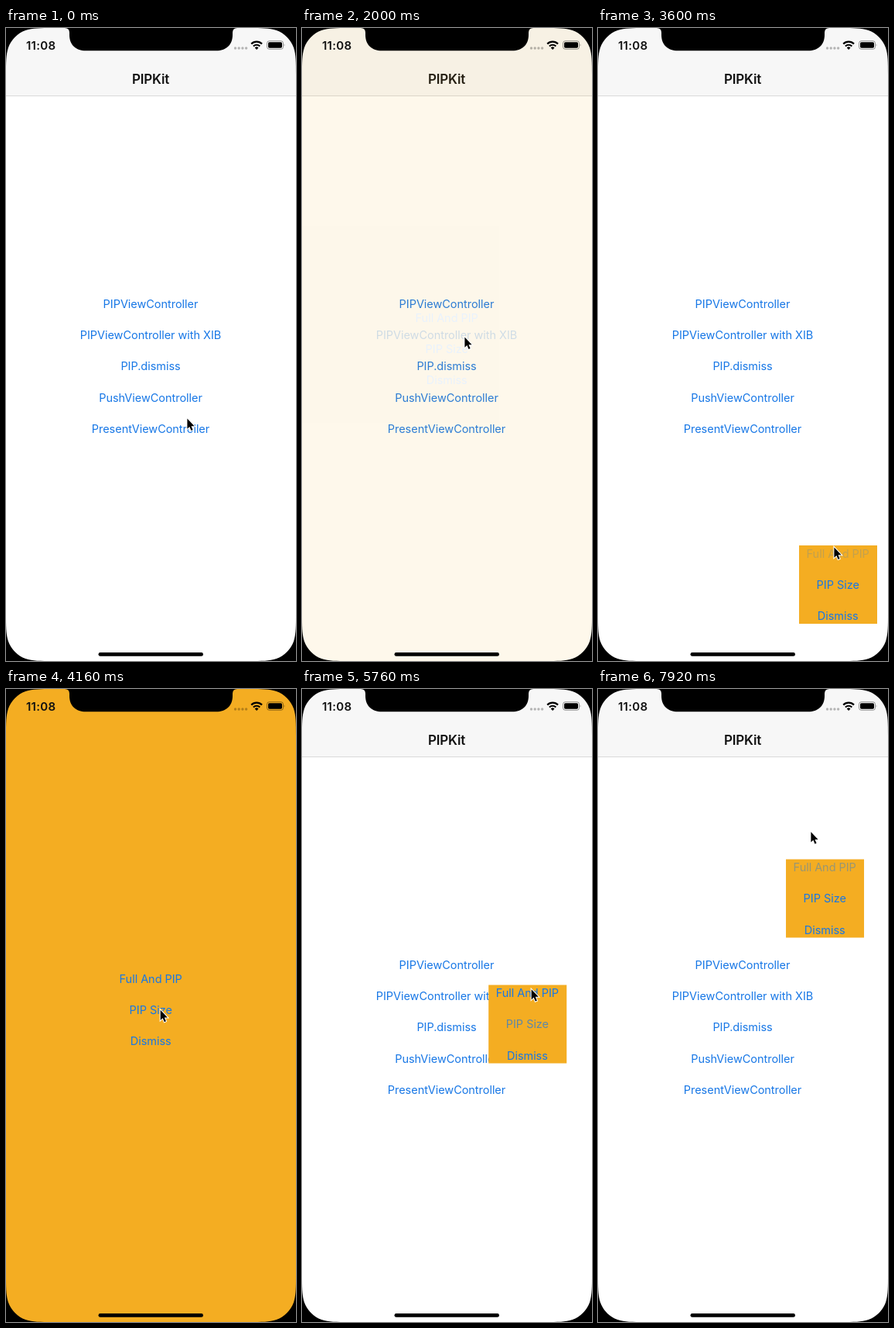
These frames come from a looping animation (375x816 px, 8 s). An HTML page:

```html
<!DOCTYPE html>
<html lang="en">
<head>
<meta charset="utf-8">
<title>PIPKit</title>
<style>
  html, body { margin: 0; width: 100%; height: 100%; overflow: hidden; background: #000; }
  svg { display: block; width: 100%; height: 100%; }
  text { font-family: Inter, Roboto, sans-serif; text-anchor: middle; }
  .btn { font-size: 14.5px; letter-spacing: -.04px; fill: #1777e6; }
  .bold { font-weight: 600; fill: #111; }
</style>
</head>
<body>
<svg viewBox="0 0 375 816">
  <defs>
    <path id="corner" d="M0 0V61C0 43.5 0 34.7 3 25.3C6.8 14.9 14.9 6.8 25.3 3C34.7 0 43.5 0 61 0Z"/>
  </defs>
  <rect width="375" height="816" fill="#fff"/>
  <rect width="375" height="87" fill="#f7f7f7"/>
  <rect y="87" width="375" height="1" fill="#d9d9d9"/>
  <text class="bold" x="187" y="71.5" font-size="17" letter-spacing="-.2">PIPKit</text>
  <g id="menu"></g>
  <g id="pip">
    <rect id="panel" fill="#f4ad22"/>
    <g id="actions"></g>
  </g>

  <!-- status bar -->
  <text class="bold" x="45.2" y="27.5" font-size="15" letter-spacing=".3">11:08</text>
  <g fill="#000" fill-opacity=".27">
    <circle cx="296.5" cy="26" r="1.7"/><circle cx="301.2" cy="26" r="1.7"/>
    <circle cx="305.9" cy="26" r="1.7"/><circle cx="310.6" cy="26" r="1.7"/>
  </g>
  <g fill="none" stroke="#000" stroke-width="2.2">
    <path d="M317.2 20.6a9.6 9.6 0 0 1 13.8 0"/>
    <path d="M319.9 23.5a5.9 5.9 0 0 1 8.4 0"/>
  </g>
  <path d="M324.1 28l-2.4-2.6a3.4 3.4 0 0 1 4.8 0z"/>
  <rect x="337.5" y="16.7" width="21" height="10.6" rx="3" fill="none" stroke="#000" stroke-opacity=".4"/>
  <rect x="339" y="18.2" width="18" height="7.6" rx="1.7"/>
  <path d="M359.7 20.2q1.5 1.8 0 3.6z" fill-opacity=".45"/>

  <!-- device outline -->
  <use href="#corner"/>
  <use href="#corner" transform="translate(375 0) scale(-1 1)"/>
  <use href="#corner" transform="translate(0 816) scale(1 -1)"/>
  <use href="#corner" transform="translate(375 816) scale(-1)"/>
  <path d="M76 0Q82 0 82 6V9C82 22 91 29.3 103 29.3H272C284 29.3 293 22 293 9V6Q293 0 299 0Z"/>
  <rect x="119.5" y="805" width="135.5" height="4.8" rx="2.4"/>
  <path id="cursor" d="M.4 1.6V14.8L3.4 12L5.5 17L7.6 16.1L5.5 11.2H9.6Z" stroke="#fff" stroke-width="2" paint-order="stroke"/>
</svg>
<script>
const LOOP = 8000, STEP = 80, MORPH = 138;
const el = id => document.getElementById(id);
const clamp = v => Math.min(1, Math.max(0, v));
const ease = v => (v = clamp(v), v * v * (3 - 2 * v));

function addButtons(id, labels, x, y) {
  return labels.map((label, i) => {
    const t = document.createElementNS("http://www.w3.org/2000/svg", "text");
    t.setAttribute("class", "btn");
    t.setAttribute("x", x);
    t.setAttribute("y", y + i * 40.3);
    t.textContent = label;
    el(id).append(t);
    return t;
  });
}

const menu = addButtons("menu", ["PIPViewController", "PIPViewController with XIB",
  "PIP.dismiss", "PushViewController", "PresentViewController"], 187, 360.8);
const actions = addButtons("actions", ["Full And PIP", "PIP Size", "Dismiss"], 0, -35);

// panel edges: left, top, right, bottom
const FULL = [0, 0, 375, 816];
const square = (x, y) => [x, y, x + 101, y + 101];
const LOW = square(260, 667), MID = square(260, 361);
const morph = (t, from, to) => [[t, ...from], [t + MORPH, ...to]];

const panelPath = [
  ...morph(2869, FULL, LOW),
  ...morph(3660, LOW, FULL),
  ...morph(4560, FULL, LOW),
  [5534, ...LOW], [5869, ...square(235, 287)],
  [5950, ...square(235, 287)], [6110, ...MID],
  ...morph(6360, MID, FULL),
  ...morph(6949, FULL, MID),
  [7691, ...MID], [8167, ...square(224, 61)]
];

const cursorPath = [
  [1100, 234, 502], [1700, 210, 397],
  [2200, 210, 397], [2650, 196, 371],
  [3000, 196, 371], [3550, 305, 668],
  [3800, 305, 668], [4275, 181, 368],
  [4650, 181, 368], [5300, 315, 717],
  [5500, 315, 717], [5835, 293.5, 337],
  [5980, 293.5, 337], [6260, 308, 368],
  [6480, 308, 368], [6850, 168, 370],
  [7050, 168, 370], [7450, 292, 372],
  [7640, 292, 372], [8116, 265, 72]
];

// button, pressed at, released at
const presses = [
  [menu[1], 1880, 2030],
  [actions[0], 2790, 2900],
  [actions[0], 3590, 3670],
  [actions[0], 4490, 4580],
  [actions[1], 5430, 5620],
  [actions[0], 6300, 6370],
  [actions[0], 6880, 6980],
  [actions[0], 7590, 7838]
];

function along(path, t) {
  const i = path.findIndex(k => k[0] > t);
  if (i === 0) return path[0].slice(1);
  if (i < 0) return path[path.length - 1].slice(1);
  const [t0, ...a] = path[i - 1], [t1, ...b] = path[i];
  const p = ease((t - t0) / (t1 - t0));
  return a.map((v, n) => v + (b[n] - v) * p);
}

function draw(t) {
  const [left, top, right, bottom] = along(panelPath, t);
  const w = right - left, h = bottom - top;
  const panel = el("panel");
  Object.entries({ x: left, y: top, width: w, height: h })
    .forEach(([k, v]) => panel.setAttribute(k, v));
  el("pip").setAttribute("opacity", ease((t - 1960) / 218));

  // safe area pushes the labels down while full screen
  const inset = 5.6 * (h - 101) / 715;
  el("actions").setAttribute("transform",
    `translate(${left + w / 2 - .3} ${top + h / 2 + inset})`);

  [...menu, ...actions].forEach(b => b.setAttribute("opacity", 1));
  for (const [button, down, up] of presses) {
    if (t >= down && t < up + 250) {
      button.setAttribute("opacity", .22 + .78 * ease((t - up) / 250));
    }
  }
  el("cursor").setAttribute("transform", `translate(${along(cursorPath, t)})`);
}

const start = performance.now();
function tick() {
  const t = (performance.now() - start + 4) % LOOP;
  draw(Math.floor(t / STEP) * STEP);
  requestAnimationFrame(tick);
}
tick();
</script>
</body>
</html>
```
